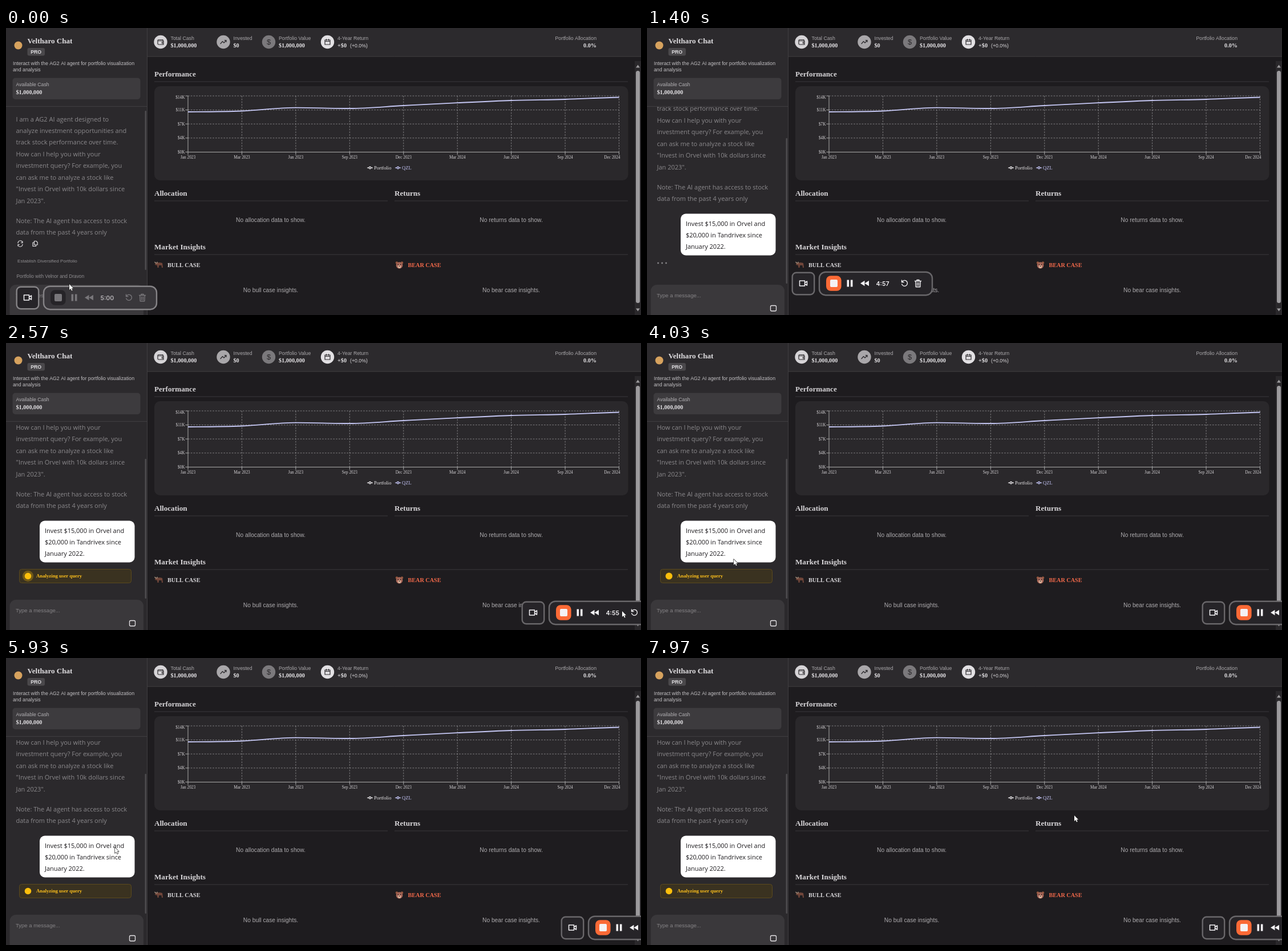
Recreate the animation shown at these times as an HTML page with a canvas. Size 1113 px wide and 503 px high, loop 8000 ms.

```html
<!DOCTYPE html>
<html lang="en">
<head>
<meta charset="utf-8">
<title>Portfolio dashboard</title>
<style>
html, body { margin: 0; width: 1113px; height: 503px; overflow: hidden; background: #1e1c1f; }
canvas { display: block; }
</style>
</head>
<body>
<canvas id="stage" width="1113" height="503"></canvas>
<script>
const ctx = document.getElementById('stage').getContext('2d');
const LOOP = 8000, SENT = 900, ANALYZING = 2000, ACTIVE = 200;
const SERIF = '"Liberation Serif", serif', SANS = '"Liberation Sans", sans-serif';
const CHAT = '11px "Open Sans", sans-serif';
const SMALL = '8.75px ' + SANS, BODY = '10.2px ' + SANS;
const HEADING = 'bold 13.1px ' + SERIF, VALUE = 'bold 10.2px ' + SERIF;
const AXIS = '7.3px ' + SERIF;

const intro = [
  'I am a AG2 AI agent designed to',
  'analyze investment opportunities and',
  'track stock performance over time.',
  'How can I help you with your',
  'investment query? For example, you',
  'can ask me to analyze a stock like',
  '"Invest in Orvel with 10k dollars since',
  'Jan 2023".'
];
const note = ['Note: The AI agent has access to stock', 'data from the past 4 years only'];
const request = ['Invest $15,000 in Orvel and', '$20,000 in Tandrivex since', 'January 2022.'];

// Rows of [time, x, y]
const barPath = [[0, 18, 453], [900, 18, 453], [1380, 254, 428], [1430, 254, 428], [2540, 904, 453], [2610, 904, 453], [2740, 973, 453]];
const pointerPath = [
  [0, 111, 449], [800, 111, 449], [1700, 597, 453], [2540, 1080, 470], [2610, 1080, 470], [2740, 1113, 470],
  [3200, 1025, 168], [3370, 1010, 190], [3850, 152, 379], [4030, 152, 379],
  [5700, 190, 332], [5930, 190, 332], [6650, 749, 276]
];

function track(rows, t) {
  const i = rows.findIndex(row => row[0] > t);
  if (i < 0) return rows[rows.length - 1].slice(1);
  const [t0, x0, y0] = rows[i - 1], [t1, x1, y1] = rows[i];
  const p = (t - t0) / (t1 - t0);
  return [x0 + (x1 - x0) * p, y0 + (y1 - y0) * p];
}

function text(str, x, y, font, color, align = 'left') {
  ctx.font = font;
  ctx.fillStyle = color;
  ctx.textAlign = align;
  ctx.fillText(str, x, y);
}

function box(x, y, w, h, r, fill, stroke, width = 1) {
  ctx.beginPath();
  ctx.roundRect(x, y, w, h, r);
  if (fill) { ctx.fillStyle = fill; ctx.fill(); }
  if (stroke) { ctx.strokeStyle = stroke; ctx.lineWidth = width; ctx.stroke(); }
}

function disc(x, y, r, fill) {
  ctx.beginPath();
  ctx.arc(x, y, r, 0, 7);
  ctx.fillStyle = fill;
  ctx.fill();
}

function line(x0, y0, x1, y1, color, width = 1, dash = []) {
  ctx.beginPath();
  ctx.setLineDash(dash);
  ctx.moveTo(x0, y0);
  ctx.lineTo(x1, y1);
  ctx.strokeStyle = color;
  ctx.lineWidth = width;
  ctx.stroke();
  ctx.setLineDash([]);
}

function shape(path, x, y, { fill, stroke, width = 1.2 }) {
  ctx.save();
  ctx.translate(x, y);
  ctx.lineJoin = ctx.lineCap = 'round';
  const p = new Path2D(path);
  if (stroke) { ctx.strokeStyle = stroke; ctx.lineWidth = width; ctx.stroke(p); }
  if (fill) { ctx.fillStyle = fill; ctx.fill(p); }
  ctx.restore();
}

const icons = {
  wallet: 'M4 -2V-4H-3.5Q-5 -4 -5 -2.8V3Q-5 4.5 -3.5 4.5H5V-2H-4M5 0H2.5V2.5H5',
  trend: 'M-5 3L-1.5 -1L1 1.5L5 -3M2 -3H5V0',
  calendar: 'M-4.5 -3.5H4.5V4.5H-4.5ZM-4.5 -1H4.5M-2 -5V-2.5M2 -5V-2.5',
  refresh: 'M-4 -1A4 4 0 0 1 4 -1.5M4 -4V-1.5H1.5M4 1A4 4 0 0 1 -4 1.5M-4 4V1.5H-1.5',
  copy: 'M-1.5 -4.5H2L4.2 -2.3V2H-1.5ZM-1.5 -2H-4V4.5H1.5V2',
  camera: 'M-6.5 -4.5H2.5V4.5H-6.5ZM2.5 -1L6.5 -3.5V3.5L2.5 1',
  pause: 'M-5 -6H-1.4V6H-5ZM1.4 -6H5V6H1.4Z',
  rewind: 'M0 -4.8V4.8L-7.5 0ZM7.5 -4.8V4.8L0 0Z',
  undo: 'M-4.5 -2.5A5 5 0 1 1 -4.8 1.5M-5 -5.5V-2H-1.5',
  trash: 'M-5.5 -4H5.5M-4.3 -4L-3.8 6.3H3.8L4.3 -4M-2 -4V-6H2V-4M-1.4 -1.4V4M1.4 -1.4V4',
  pointer: 'M0 0V10L2.4 7.8L4 11.4L5.6 10.7L4 7.2H7Z'
};

function drawStat(x, label, value, tone, icon) {
  disc(x, 24.5, 11.7, tone);
  if (icon) shape(icons[icon], x, 24.5, { stroke: '#2b292c' });
  else text('$', x, 29, '13px ' + SANS, '#2b292c', 'center');
  text(label, x + 17.5, 20.5, SMALL, '#aaa8ab');
  text(value, x + 17.5, 34, VALUE, '#e2e0e3');
}

function drawChart() {
  box(260, 102, 830.5, 165, 10, '#2a282b');
  const step = 755.5 / 8, left = 319;
  const grid = '#99979a';
  ['$14K', '$11K', '$7K', '$4K', '$0K'].forEach((label, i) => {
    const y = 119 + i * 24.6;
    if (i < 4) line(left, y, 1074.5, y, grid, .8, [2.6, 2.2]);
    line(left - 4.5, y, left, y, '#aaa');
    text(label, 313.5, y + (i ? 2.5 : 4.5), AXIS, '#d5d3d6', 'right');
  });
  ['Jan 2023', 'Mar 2023', 'Jun 2023', 'Sep 2023', 'Dec 2023', 'Mar 2024', 'Jun 2024', 'Sep 2024', 'Dec 2024']
    .forEach((label, i) => {
      const x = left + i * step;
      if (i) line(x, 119, x, 217.5, grid, .8, [2.6, 2.2]);
      line(x, 217.5, x, 222, '#aaa');
      text(label, i < 8 ? x : 1076.5, 229, AXIS, '#d5d3d6', i < 8 ? 'center' : 'right');
    });
  line(left, 119, left, 217.5, '#aaa');
  line(left, 217.5, 1074.5, 217.5, '#aaa');

  const ys = [147, 145.5, 139.6, 141, 136, 131.2, 127, 125, 121.5];
  const slope = i => i === 2 || i === 3 ? 0 : ((ys[i + 1] ?? ys[i]) - (ys[i - 1] ?? ys[i])) / 6;
  ctx.beginPath();
  ctx.moveTo(left, ys[0]);
  for (let i = 0; i < 8; i++) {
    const x = left + i * step;
    ctx.bezierCurveTo(x + step / 3, ys[i] + slope(i), x + step * 2 / 3, ys[i + 1] - slope(i + 1), x + step, ys[i + 1]);
  }
  ctx.strokeStyle = '#c5c7f3';
  ctx.lineWidth = 1.8;
  ctx.stroke();

  [['Portfolio', 633, '#e8e6e9'], ['QZL', 682, '#c3c4f5']].forEach(([name, x, color]) => {
    line(x, 245, x + 10, 245, color, 1.3);
    disc(x + 5, 245, 2.4, color);
    disc(x + 5, 245, 1.1, '#2a282b');
    text(name, x + 12, 247.8, '8.6px ' + SERIF, color);
  });
}

function drawBull() {
  shape('M-5 -3Q0 -5 6 -3L7 5H5L4.5 1H0L-.5 5H-2.5L-3 1L-7 0L-6 -3Z', 268, 415, { fill: '#70463a' });
  shape('M-7 -5Q-7 -3 -4 -3M-3 -5V-3', 268, 415, { stroke: '#b39a86' });
}

function drawBear() {
  disc(685, 411.5, 2.2, '#94583f');
  disc(694, 411.5, 2.2, '#94583f');
  disc(689.5, 416, 5.8, '#a8685a');
  disc(689.5, 418.3, 2.7, '#dcb49c');
  [[687.2, 414.3], [691.8, 414.3], [689.5, 417.3]].forEach(([x, y]) => disc(x, y, .9, '#2b1a16'));
}

function drawDashboard() {
  ctx.fillStyle = '#1e1c1f';
  ctx.fillRect(0, 0, 1113, 503);
  ctx.fillStyle = '#2c2a2d';
  ctx.fillRect(248, 0, 865, 50);
  line(248, 50, 1113, 50, '#403e41');
  drawStat(271, 'Total Cash', '$1,000,000', '#d6d4d7', 'wallet');
  drawStat(381, 'Invested', '$0', '#a9a7aa', 'trend');
  drawStat(460.5, 'Portfolio Value', '$1,000,000', '#7b797c');
  drawStat(563.5, '4-Year Return', '+$0', '#e2e0e3', 'calendar');
  text('(+0.0%)', 603, 33.5, SMALL, '#d8d6d9');
  text('Portfolio Allocation', 1035, 20.5, SMALL, '#aaa8ab', 'right');
  text('0.0%', 1035, 34, VALUE, '#e2e0e3', 'right');

  [['Performance', 260, 84.5, 1090], ['Allocation', 260, 293.5, 669],
   ['Returns', 681, 293.5, 1090], ['Market Insights', 260, 387.5, 1090]].forEach(([name, x, y, end]) => {
    text(name, x, y, HEADING, '#d8d6d9');
    line(x, y + 9.5, end, y + 9.5, '#3b393c');
  });
  drawChart();
  text('No allocation data to show.', 464, 339.5, BODY, '#adabae', 'center');
  text('No returns data to show.', 885.5, 339.5, BODY, '#adabae', 'center');
  drawBull();
  drawBear();
  text('BULL CASE', 283, 419, VALUE, '#dad8db');
  text('BEAR CASE', 704.5, 419, VALUE, '#f2694a');
  text('No bull case insights.', 464, 462.5, BODY, '#adabae', 'center');
  text('No bear case insights.', 885.5, 462.5, BODY, '#adabae', 'center');

  ctx.fillStyle = '#2a282b';
  ctx.fillRect(1102, 58, 11, 445);
  box(1104, 75, 7, 407, 3.5, '#9c9a9d');
  shape('M-3.5 2.5L0 -2.5L3.5 2.5Z', 1107.5, 67, { fill: '#9c9a9d' });
  shape('M-3.5 -2.5L0 2.5L3.5 -2.5Z', 1107.5, 494, { fill: '#9c9a9d' });
}

function drawStatus(t, y) {
  box(23.5, y, 196, 24, 4, '#3a3220', '#5c4a1d');
  const x = Math.min(1, ((t + 25) % 2000) / 1400);
  const spread = 1 - (1 - x) ** 2.2;
  disc(38.5, y + 12, 5.8 + 5.5 * spread, `rgba(255,193,7,${.5 * (1 - x)})`);
  disc(38.5, y + 12, 5.8, '#fcbf0c');
  text('Analyzing user query', 53, y + 14.5, 'bold 8.75px ' + SERIF, '#fcbf1c');
}

function drawChat(t) {
  const scroll = t < SENT ? 0 : t < ANALYZING ? 59 : 73;
  ctx.fillStyle = '#2b292c';
  ctx.fillRect(0, 0, 247, 503);
  ctx.save();
  ctx.beginPath();
  ctx.rect(0, 138, 247, 312);
  ctx.clip();
  intro.forEach((row, i) => text(row, 17.5, 163.5 + i * 20.45 - scroll, CHAT, '#8b898c'));
  note.forEach((row, i) => text(row, 17.5, 341.5 + i * 20.45 - scroll, CHAT, '#8b898c'));
  if (t < SENT) {
    shape(icons.refresh, 25, 378, { stroke: '#e0dee1' });
    shape(icons.copy, 51, 378, { stroke: '#e0dee1' });
    text('Establish Diversified Portfolio', 20, 410.5, '8.1px ' + SANS, '#8f8d90');
    text('Portfolio with Velnor and Dravon', 18.5, 437.5, '8.3px ' + SANS, '#8f8d90');
  } else {
    const y = 384.5 - scroll;
    box(59, y, 166.5, 73, 9, '#fff');
    request.forEach((row, i) => text(row, 68, y + 21 + i * 20.45, CHAT, '#1c1a1d'));
    if (t < ANALYZING) [19.5, 26.5, 33.5].forEach(x => disc(x, 412, 1.4, '#8a888b'));
    else drawStatus(t, 396.5);
  }
  ctx.restore();

  const thumb = t < SENT ? [145, 424] : t < ANALYZING ? [193, 448] : [203, 448];
  box(243.5, thumb[0], 2.5, thumb[1] - thumb[0], 1, '#4e4c4f');
  line(247.5, 0, 247.5, 503, '#3f3d40');

  box(6.5, 450, 234.5, 70, 11, '#3a383b');
  text('Type a message...', 17, 472, '9.5px ' + SANS, '#858386');
  if (t >= SENT) box(216.5, 486.5, 10, 9.5, 2, null, '#e6e4e7', 1.3);

  ctx.fillStyle = '#2c2a2d';
  ctx.fillRect(0, 0, 247, 137);
  line(0, 137.5, 247, 137.5, '#403e41');
  disc(21.5, 30.5, 7, '#d6a25e');
  text('Veltharo Chat', 37.5, 26.5, HEADING, '#e0dee1');
  box(37.5, 35, 30.5, 13.5, 3, '#4a484b');
  text('PRO', 52.7, 45, 'bold 8.75px ' + SANS, '#dddbde', 'center');
  text('Interact with the AG2 AI agent for portfolio visualization', 12, 64.5, SMALL, '#c2c0c3');
  text('and analysis', 12, 76, SMALL, '#c2c0c3');
  box(11.5, 87.5, 224, 37.5, 5, '#3d3b3e');
  text('Available Cash', 17.5, 102, SMALL, '#b3b1b4');
  text('$1,000,000', 17.5, 115.5, VALUE, '#e2e0e3');
}

function drawRecorder(t) {
  const [x, y] = track(barPath, t);
  const active = t >= ACTIVE;
  const ink = active ? '#f4f2f5' : '#78767a';
  const border = active ? '#69676a' : '#858386';
  const mid = y + 19.5;
  const seconds = 300 - Math.floor(t * .0019 + .5);
  box(x + .7, y + .7, 38.5, 38.5, 7, '#262428', border, 2.4);
  box(x + 48, y - .3, 198, 40.5, 11, active ? '#262428' : '#39373b', border, 2.4);
  shape(icons.camera, x + 20, mid, { stroke: '#f4f2f5', width: 1.5 });
  box(x + 60, mid - 13.3, 26.6, 26.6, 8, active ? '#fb6a36' : '#262428');
  box(x + 67, mid - 6.5, 13, 13, 2, ink);
  shape(icons.pause, x + 101.5, mid, { fill: ink });
  shape(icons.rewind, x + 127.5, mid, { fill: ink });
  const clock = Math.floor(seconds / 60) + ':' + String(seconds % 60).padStart(2, '0');
  text(clock, x + 147.5, mid + 4, '600 10.6px Inter, sans-serif', active ? ink : '#b5b3b6');
  shape(icons.undo, x + 197.5, mid, { stroke: ink, width: 1.4 });
  shape(icons.trash, x + 221, mid, { stroke: ink, width: 1.4 });
}

function drawPointer(t) {
  if (t > 800 && t < 1700) return;
  const [x, y] = track(pointerPath, t);
  shape(icons.pointer, x, y, { fill: '#fff', stroke: '#222', width: 1.3 });
}

function frame(now) {
  const t = now % LOOP;
  drawDashboard();
  drawChat(t);
  drawRecorder(t);
  drawPointer(t);
  requestAnimationFrame(frame);
}
requestAnimationFrame(frame);
</script>
</body>
</html>
```
